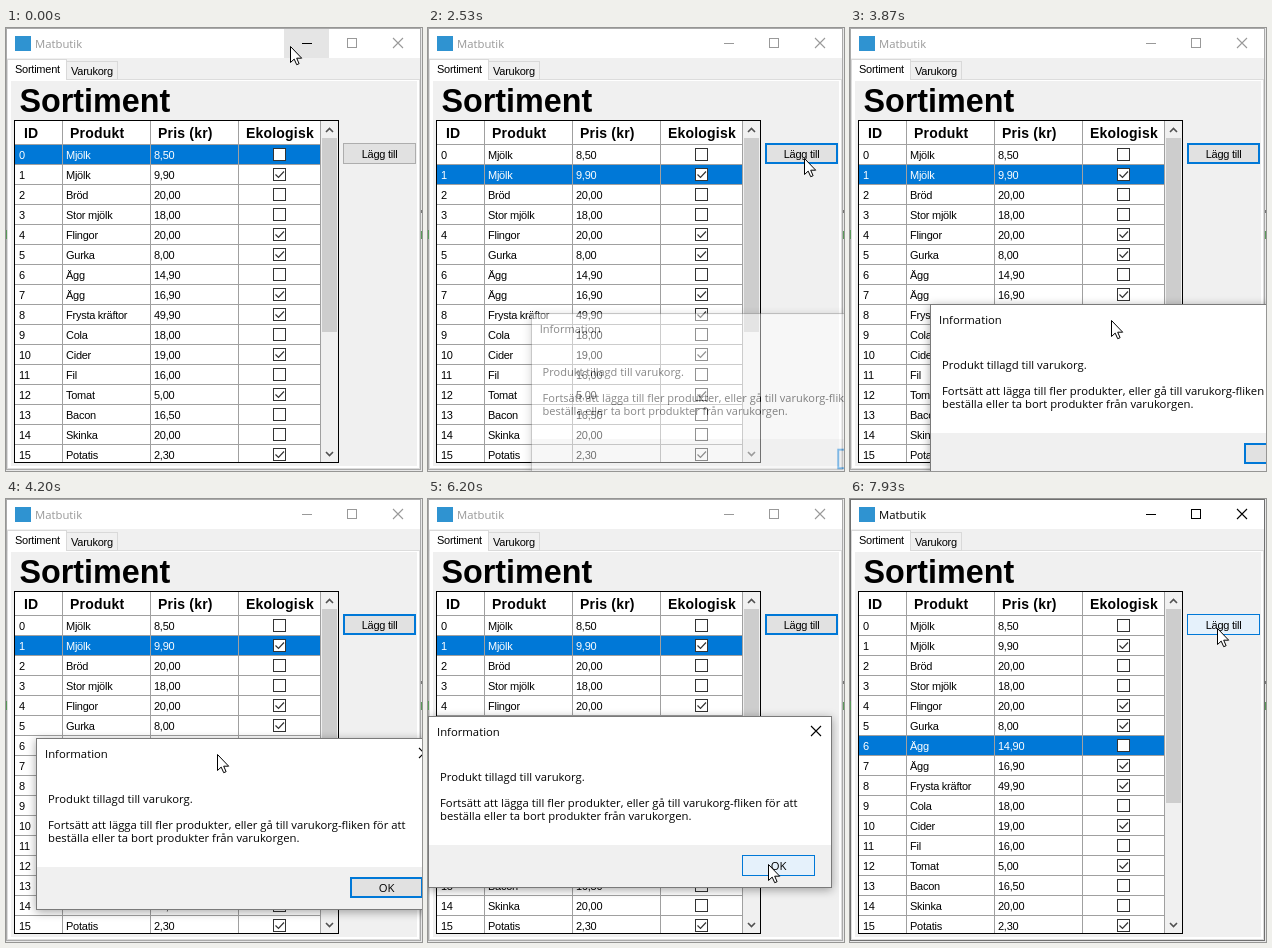
Animation of 416x443 px, one loop 8 s. Source, as an HTML page:

```html
<!DOCTYPE html>
<html lang="sv">
<head>
<meta charset="utf-8">
<title>Matbutik</title>
<style>
html, body { margin: 0; width: 100%; height: 100%; overflow: hidden; background: #fff }
svg { display: block; width: 416px; height: 443px }
text { white-space: pre }
.ui { font: 11.3px "Open Sans", sans-serif }
.cell { font: 11px "Liberation Sans", Arial, sans-serif; letter-spacing: -.25px }
.head { font: bold 14px "Liberation Sans", Arial, sans-serif; letter-spacing: .2px }
.big { font: bold 32.3px "Liberation Sans", Arial, sans-serif }
.mid { text-anchor: middle }
.shadow { filter: drop-shadow(0 2px 5px rgba(0, 0, 0, .35)) }
</style>
</head>
<body>
<svg id="stage" viewBox="0 0 416 443"></svg>
<script>
const LOOP = 8000, TICK = 1000 / 15, BLUE = '#0078d7';

const products = [
  ['Mjölk', '8,50', 0], ['Mjölk', '9,90', 1], ['Bröd', '20,00', 0], ['Stor mjölk', '18,00', 0],
  ['Flingor', '20,00', 1], ['Gurka', '8,00', 1], ['Ägg', '14,90', 0], ['Ägg', '16,90', 1],
  ['Frysta kräftor', '49,90', 1], ['Cola', '18,00', 0], ['Cider', '19,00', 1], ['Fil', '16,00', 0],
  ['Tomat', '5,00', 1], ['Bacon', '16,50', 0], ['Skinka', '20,00', 0], ['Potatis', '2,30', 1]
];

// Pointer track: time, x, y
const track = [
  [0, 284, 18], [670, 284, 18], [930, 268, 22], [1000, 268, 22], [1330, 147, 119], [1530, 128, 148],
  [1740, 128, 148], [2270, 376, 130], [3000, 376, 130], [3330, 300, 260], [3470, 279, 299],
  [3530, 279, 299], [3870, 261, 292], [4400, 181, 233], [4670, 181, 233], [4870, 235, 253],
  [5530, 335, 353], [5870, 341, 362], [6130, 341, 362], [6200, 340, 365], [6400, 340, 365],
  [6800, 110, 249], [6930, 105, 252], [7070, 90, 285], [7130, 90, 285], [7330, 120, 262],
  [7730, 352, 111], [7870, 366, 126], [7930, 367, 129], [LOOP, 367, 129]
];

const clamp = (v, lo = 0, hi = 1) => Math.min(hi, Math.max(lo, v));
const within = (t, a, b) => t >= a && t < b;
const inside = (p, x, y, w, h) => within(p.x, x, x + w) && within(p.y, y, y + h);

function pointer(t) {
  const i = Math.max(1, track.findIndex(k => k[0] >= t));
  const [a, b] = [track[i - 1], track[i]], k = (t - a[0]) / (b[0] - a[0]);
  return { x: Math.round(a[1] + (b[1] - a[1]) * k), y: Math.round(a[2] + (b[2] - a[2]) * k) };
}

const fill = (x, y, w, h, color, extra = '') =>
  `<rect x="${x}" y="${y}" width="${w}" height="${h}" fill="${color}" ${extra}/>`;
const box = (x, y, w, h, color, edge, line = 1) =>
  fill(x + line / 2, y + line / 2, w - line, h - line, color, `stroke="${edge}" stroke-width="${line}"`);
const text = (x, y, s, cls, color = '#000') => `<text x="${x}" y="${y}" class="${cls}" fill="${color}">${s}</text>`;
const path = (d, color, line = 1) => `<path d="${d}" fill="none" stroke="${color}" stroke-width="${line}"/>`;
const cross = (x, y, color) => path(`M${x} ${y}l10 10m0-10l-10 10`, color, 1.1);

function button(x, y, w, h, label, cls, state) {
  const [color, edge, line] = {
    plain: ['#e1e1e1', '#adadad', 1], focus: ['#e1e1e1', BLUE, 2],
    hover: ['#e5f1fb', BLUE, 1], down: ['#cce4f7', '#005499', 1]
  }[state];
  return box(x, y, w, h, color, edge, line) + text(x + w / 2, y + 15, label, cls + ' mid');
}

function frame(t, active) {
  const ink = active ? '#000' : '#999', hover = clamp((930 - t) / 200);
  return fill(0, 0, 416, 443, '#e8e8e8') + box(0, 0, 415, 442, '#f0f0f0', active ? '#707070' : '#aaa') +
    fill(0, 202, 1, 9, '#5a9a5a') + fill(415, 182, 1, 3, '#777') + fill(415, 203, 1, 8, '#5a9a5a') +
    fill(1, 1, 413, 29, '#fff') + fill(9, 8, 16, 15, '#2f93d1') + text(29, 20, 'Matbutik', 'ui', ink) +
    fill(278, 1, 45, 29, '#e5e5e5', `opacity="${hover}"`) +
    fill(296, 15, 10, 1, hover > .5 ? '#000' : ink) + box(341, 10, 10, 10, 'none', ink) + cross(387, 10, ink) +
    box(1, 51, 413, 390, '#fff', '#dcdcdc') + fill(5, 53, 406, 385, '#f0f0f0') +
    box(60, 33, 52, 19, '#f0f0f0', '#d9d9d9') + box(1, 31, 60, 21, '#fff', '#d9d9d9') + fill(2, 51, 58, 1, '#fff') +
    text(9, 45, 'Sortiment', 'cell') + text(65, 47, 'Varukorg', 'cell') +
    text(13.5, 83.5, 'Sortiment', 'big');
}

function row([name, price, eco], i, selected) {
  const y = 117 + 20 * i, ink = selected ? '#fff' : '#000';
  return (selected ? fill(9, y, 305, 19, BLUE) : '') + (i < 15 ? fill(9, y + 19, 306, 1, '#a0a0a0') : '') +
    text(13, y + 14, i, 'cell', ink) + text(60, y + 14, name, 'cell', ink) + text(148, y + 14, price, 'cell', ink) +
    box(267, y + 3, 13, 13, '#fff', '#333') +
    (eco ? path(`M269.5 ${y + 9.5}l3 3 5.5-6`, '#333', 1.2) : '');
}

function grid(selected) {
  return fill(8, 92, 325, 343, '#fff') +
    [[18, 'ID'], [64, 'Produkt'], [152, 'Pris (kr)'], [240, 'Ekologisk']].map(([x, s]) => text(x, 110, s, 'head')).join('') +
    fill(9, 116, 306, 1, '#a0a0a0') +
    products.map((p, i) => row(p, i, i === selected)).join('') +
    [56, 144, 232, 314].map(x => fill(x, 93, 1, 341, '#a0a0a0')).join('') +
    fill(315, 93, 17, 341, '#f0f0f0') + fill(316, 110, 15, 194, '#cdcdcd') +
    path('M320 104l3.5-3.5 3.5 3.5M320 424l3.5 3.5 3.5-3.5', '#505050', 1.6) +
    box(8, 92, 325, 343, 'none', '#000');
}

function dialog(t, mouse) {
  if (!within(t, 2440, 6530)) return '';
  const grab = pointer(clamp(t, 3530, 4400)), x = grab.x - 181, y = grab.y - 16;
  const opening = clamp((t - 2440) / 200), closing = clamp((t - 6400) / 130);
  const scale = 1 - .16 * (1 - opening) ** 3 - .08 * closing;
  const state = within(t, 6260, 6330) ? 'down' : inside(mouse, x + 314, y + 139, 73, 21) ? 'hover' : 'focus';
  return `<g opacity="${opening * (1 - closing)}" transform="translate(${x + 202} ${y + 85.5}) scale(${scale}) translate(-202 -85.5)">` +
    fill(0, 0, 404, 172, '#fff', 'class="shadow"') + fill(1, 129, 402, 42, '#f0f0f0') +
    box(0, 0, 404, 172, 'none', '#7a7a7a') +
    text(9, 20, 'Information', 'ui') + cross(383, 10, '#000') +
    text(12, 65, 'Produkt tillagd till varukorg.', 'ui') +
    text(12, 91, 'Fortsätt att lägga till fler produkter, eller gå till varukorg-fliken för att', 'ui') +
    text(12, 104, 'beställa eller ta bort produkter från varukorgen.', 'ui') +
    button(314, 139, 73, 21, 'OK', 'ui', state) + '</g>';
}

function scene(t) {
  const mouse = pointer(t), active = within(t, 1600, 2440) || t >= 6430;
  const selected = t < 1600 ? 0 : t < 6870 ? 1 : 6;
  const add = within(t, 2330, 2400) ? 'down'
    : active && inside(mouse, 337, 115, 73, 21) ? 'hover'
    : within(t, 2400, 6870) ? 'focus' : 'plain';
  return frame(t, active) + grid(selected) + button(337, 115, 73, 21, 'Lägg till', 'cell', add) + dialog(t, mouse) +
    `<path transform="translate(${mouse.x + .5} ${mouse.y + .5})" fill="#fff" stroke="#000" d="M0 0V16L3.7 12.6 6.2 18.2 8.6 17.2 6.2 11.7H11.2Z"/>`;
}

const stage = document.getElementById('stage');
let shown = -1;
function draw(now) {
  const tick = Math.floor((now % LOOP + 4) / TICK);
  if (tick !== shown) stage.innerHTML = scene(Math.min(tick * TICK, LOOP));
  shown = tick;
  requestAnimationFrame(draw);
}
draw(performance.now());
</script>
</body>
</html>
```
